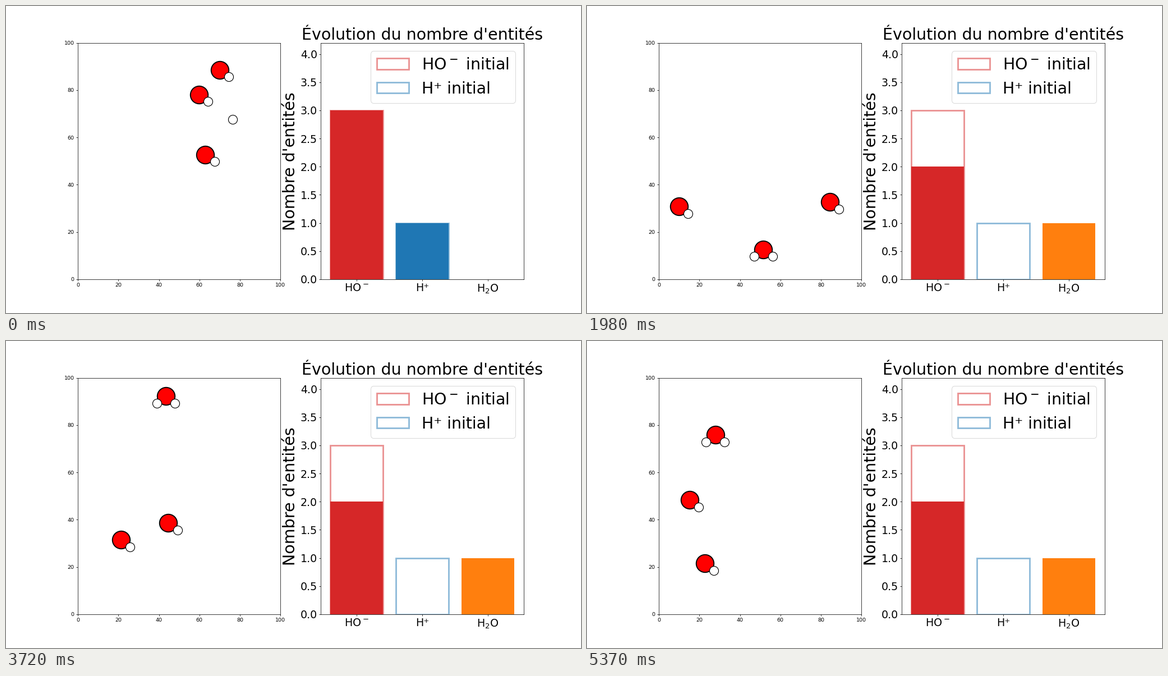
These frames come from a looping animation (1025 by 547 pixels, 5400 ms). A matplotlib script:

```python
import numpy as np
import matplotlib.pyplot as plt
from matplotlib.animation import FuncAnimation

DPI = 1025 / 15
INTERVAL = 30
CYCLE = 90          # one run of the reaction, in frames
RUNS = 2
REACTION = 25       # frame at which H+ joins an HO- ion
LOW, HIGH = 5, 95   # walls the particles bounce off
BOND = np.array([4.5, -3.0])
MIRROR = np.array([-1, 1])
BIG, MEDIUM = 30, 20

# Velocities change only at these frames; beyond a wall, paths are mirrored back.
TURNS = [0, 26, 34, 66, 86, 89]
WATER = ([69.9, 57.45, 43.45, 51.55, 34.15, 27.85],
         [101.45, 89.55, 97.75, 177.35, 97.15, 114.15])
ION_LEFT = ([59.85, -28.05, 21.35, 0.05, -12.15, -5.25],
            [78.15, 38.25, 31.55, -20.75, -114.85, -131.65])
ION_RIGHT = ([62.95, 61.45, 44.65, 84.35, 136.35, 167.45],
             [52.75, -16.35, -28.55, -22.65, -12.85, -11.45])
PROTON = ([76.35, 128], [67.55, 87])


def bounce(value):
    span = HIGH - LOW
    return HIGH - abs((value - LOW) % (2 * span) - span)


def position(path, n, times=TURNS):
    return np.array([bounce(np.interp(n, times, axis)) for axis in path])


# The hair over a whole pixel keeps rounding from losing one.
fig, (box, chart) = plt.subplots(1, 2, figsize=(1025.01 / DPI, 547.01 / DPI), dpi=DPI)

box.set(xlim=(0, 100), ylim=(0, 100))
oxygens = box.scatter([], [], s=1100, c="red", edgecolors="black", linewidths=2, zorder=1)
hydrogens = box.scatter([], [], s=285, c="white", edgecolors="black", linewidths=1.2, zorder=1.1)

species = ["HO$^-$", "H⁺", "H$_2$O"]
bars = chart.bar(range(3), [3, 1, 0], color=["tab:red", "tab:blue", "tab:orange"])
for x, count, color in [(0, 3, "tab:red"), (1, 1, "tab:blue")]:
    chart.bar(x, count, fill=False, edgecolor=color, linewidth=3, alpha=0.5,
              label=species[x] + " initial")
chart.set(xlim=(-0.54, 2.54), ylim=(0, 4.2))
chart.set_xticks(range(3), species)
chart.set_yticks(np.arange(0, 4.1, 0.5))
chart.tick_params(labelsize=MEDIUM)
chart.set_title("Évolution du nombre d'entités", fontsize=BIG)
chart.set_ylabel("Nombre d'entités", fontsize=BIG)
chart.legend(fontsize=BIG, loc="upper right")


def update(frame):
    n = frame % CYCLE
    reacted = n >= REACTION
    centers = np.array([position(p, n) for p in (WATER, ION_LEFT, ION_RIGHT)])
    free = centers[0] + BOND * MIRROR if reacted else position(PROTON, n, [0, REACTION])
    oxygens.set_offsets(centers)
    hydrogens.set_offsets(np.vstack([centers + BOND, free]))
    for bar, count in zip(bars, (2, 0, 1) if reacted else (3, 1, 0)):
        bar.set_height(count)
    return [oxygens, hydrogens, *bars]


anim = FuncAnimation(fig, update, frames=CYCLE * RUNS, interval=INTERVAL,
                     repeat=True, repeat_delay=0, blit=False)
plt.show()
```
